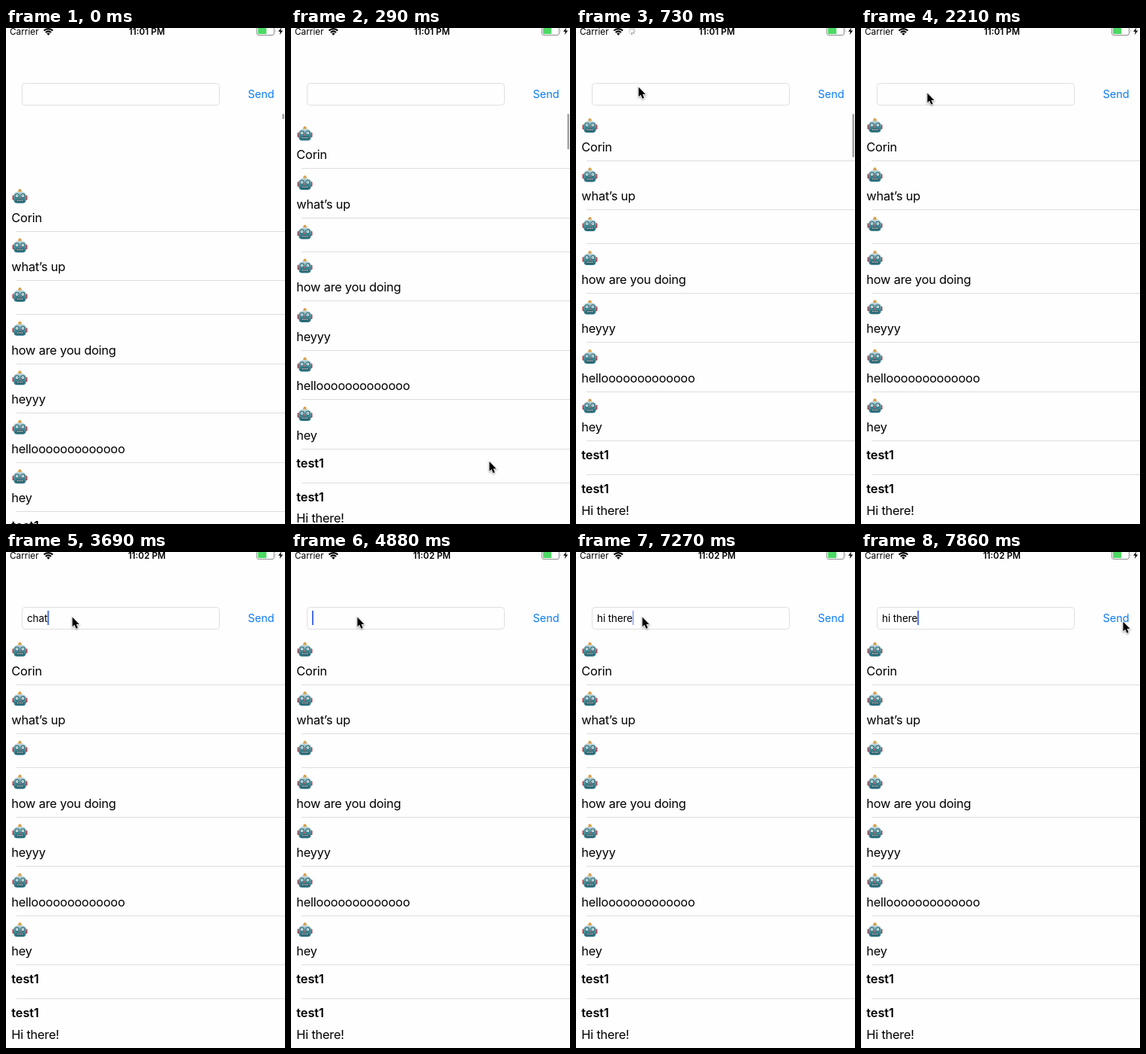
Animation, 372 px wide and 659 px high, one loop 8000 ms. Source, as an HTML page:

```html
<!DOCTYPE html>
<html lang="en">
<head>
<meta charset="utf-8">
<title>Chat</title>
<style>
  html, body { margin: 0; width: 100%; height: 100%; overflow: hidden; background: #fefefe; }
  svg { display: block; width: 372px; height: 659px; }
  text { font-family: Inter, "Liberation Sans", sans-serif; white-space: pre; }
  .row { font-size: 16.4px; letter-spacing: -.22px; }
  .bold { font-weight: 600; }
  .row.bold { letter-spacing: -.1px; }
  .status { font-size: 11.8px; }
  .input { font-size: 13.6px; letter-spacing: -.15px; }
  .send { font-size: 14.6px; letter-spacing: -.1px; fill: #0a7cf8; }
</style>
</head>
<body>
<svg viewBox="0 0 372 659">
  <defs>
    <linearGradient id="metal" x2="0" y2="1">
      <stop offset="0" stop-color="#d6e4e8"/>
      <stop offset=".3" stop-color="#8db4bc"/>
      <stop offset=".6" stop-color="#3f8f9b"/>
      <stop offset="1" stop-color="#246a78"/>
    </linearGradient>
    <g id="robot">
      <rect x=".5" y="9.4" width="3" height="6.4" rx="1.2" fill="#b5434d"/>
      <rect x="17.5" y="9.4" width="3" height="6.4" rx="1.2" fill="#b5434d"/>
      <path d="M2 10.5Q2.6 4 10.5 4T19 10.5L18.4 17Q17.8 20 14.4 20H6.6Q3.2 20 2.6 17Z" fill="url(#metal)"/>
      <path d="M8.1 4.6Q8.3 1 10.5 1T12.9 4.6Z" fill="#d9a04a"/>
      <g fill="#f4fafa" stroke="#2c6f7c" stroke-width="1.2">
        <circle cx="6.6" cy="10" r="2.5"/>
        <circle cx="14.4" cy="10" r="2.5"/>
      </g>
      <g fill="#4a6f79">
        <circle cx="6.6" cy="10" r=".8"/>
        <circle cx="14.4" cy="10" r=".8"/>
      </g>
      <path d="M10.5 11L11.8 13.6H9.2Z" fill="#d0454e"/>
      <rect x="5.4" y="14.8" width="10.2" height="3" rx="1.1" fill="#234750"/>
      <path d="M6.6 16.3H14.7" stroke="#dfeaea" stroke-width="1.5" stroke-dasharray="1.3 .9"/>
    </g>
  </defs>

  <text class="status" x="5" y="8.8">Carrier</text>
  <g fill="none" stroke="#000" stroke-width="2.1">
    <path d="M50.6 3.6A8.3 8.3 0 0 1 62.4 3.6M52.9 5.9A5 5 0 0 1 60.1 5.9"/>
    <path d="M56.5 9.8L54.3 7.6A3.1 3.1 0 0 1 58.7 7.6Z" fill="#000" stroke="none"/>
  </g>
  <g id="spinner" stroke-width="1.1" stroke-linecap="round"></g>
  <text id="clock" class="status bold" x="187.8" y="8.8" text-anchor="middle"></text>
  <rect x="334.5" y="-1.5" width="23" height="11" rx="2.5" fill="none" stroke="#8c8c8c"/>
  <rect x="336" y="0" width="11.3" height="8" rx="1" fill="#4cd964"/>
  <path d="M359 2.3Q360.6 4 359 5.8Z" fill="#8c8c8c"/>
  <path d="M367.3 -.5L363 4.8H365.8L364.8 9L369.2 3.5H366.3Z"/>

  <rect x="21.5" y="73.5" width="263" height="29" rx="4" fill="#fefefe" stroke="#dfdfdf"/>
  <text id="input" class="input" x="28" y="92.6"></text>
  <rect id="caret" y="78" width="2" height="19" fill="#4a6ee0"/>
  <text class="send" x="322.6" y="92.8">Send</text>

  <g id="list"></g>
  <rect id="bar" x="368.4" y="114" width="2.6" rx="1.3" fill="#a3a3a3"/>
  <path id="cursor" d="M0 0V12.8L2.9 10.2L5 15.3L7.3 14.3L5.2 9.4H9.2Z" stroke="#fff"
        paint-order="stroke" stroke-width="1.6" style="filter:drop-shadow(0 1px 1px #0006)"/>
</svg>
<script>
const $ = id => document.getElementById(id);
const LOOP = 8000, LIST_TOP = 110.8, TALL = 65.5, SHORT = 45;

// Each message: sender (empty means the robot) and body.
const messages = [
  ["", "Corin"], ["", "what’s up"], ["", ""], ["", "how are you doing"], ["", "heyyy"],
  ["", "hell" + "o".repeat(13)], ["", "hey"], ["test1", ""], ["test1", "Hi there!"]
];

// Changes of state; every value holds until it is replaced.
const changes = [
  [0, { clock: "11:01 PM", text: "", caret: 0, spin: 0, bar: 1, cursor: [272, 700] }],
  [150, { cursor: [272, 640] }],
  [290, { cursor: [264.5, 576] }],
  [440, { cursor: [205, 400] }],
  [590, { cursor: [112, 150], spin: 1 }],
  [730, { cursor: [83.5, 78.5], spin: 2 }],
  [880, { cursor: [86, 86], spin: 3, bar: .5 }],
  [1030, { cursor: [88.5, 90], spin: 0, bar: 0 }],
  [1470, { cursor: [88.5, 88] }],
  [1620, { cursor: [88.5, 86.5], caret: 1 }],
  [2060, { caret: .5 }],
  [2210, { caret: 0 }],
  [2510, { caret: .5, clock: "11:02 PM" }],
  [2650, { caret: 1 }],
  [2950, { caret: .5 }],
  [3100, { caret: 0 }],
  [3390, { caret: 1, text: "c" }],
  [3540, { text: "cha" }],
  [3690, { text: "chat" }],
  [4290, { text: "cha" }],
  [4440, { text: "ch" }],
  [4730, { text: "c" }],
  [4880, { text: "" }],
  [5320, { caret: .5 }],
  [5470, { caret: 0 }],
  [5620, { spin: 1 }],
  [5770, { spin: 2, caret: 1, text: "h" }],
  [5920, { spin: 3, text: "hi" }],
  [6070, { spin: 0, text: "hi " }],
  [6370, { text: "hi th" }],
  [6520, { text: "hi the" }],
  [6670, { text: "hi ther" }],
  [6820, { text: "hi there" }],
  [7270, { caret: .5 }],
  [7420, { caret: 0, cursor: [135, 98] }],
  [7570, { cursor: [235, 104] }],
  [7710, { caret: .5, cursor: [325, 101] }],
  [7860, { caret: 1, cursor: [349.5, 92.5] }]
];
let merged = {};
const states = changes.map(([time, change]) => merged = { ...merged, ...change, time });

// Critically damped return from an overscrolled list.
function bounce(time) {
  const x = time * .0129;
  return 94 * (1 + x) * Math.exp(-x);
}

function buildList(offset) {
  let top = LIST_TOP + offset, markup = "";
  for (const [sender, body] of messages) {
    markup += sender
      ? `<text class="row bold" x="7.3" y="${top + 24.5}">${sender}</text>`
      : `<use href="#robot" x="8" y="${top + 8}"/>`;
    markup += `<text class="row" x="7.3" y="${top + 53}">${body}</text>`;
    top += body ? TALL : SHORT;
    markup += `<rect x="14" y="${Math.floor(top)}" width="358" height="1" fill="#dddde0"/>`;
  }
  return markup;
}

for (let i = 0; i < 8; i++) {
  $("spinner").innerHTML +=
    `<path d="M0 -2.4V-4.6" stroke="hsl(0 0% ${50 + i * 5}%)" transform="rotate(${-i * 45})"/>`;
}

function render(s) {
  const offset = bounce(s.time);
  $("list").innerHTML = buildList(offset);
  $("bar").setAttribute("height", Math.max(7, 58 - offset));
  $("bar").setAttribute("opacity", s.bar);
  $("clock").textContent = s.clock;
  $("input").textContent = s.text;
  $("caret").setAttribute("x", 28 + (s.text && $("input").getComputedTextLength()));
  $("caret").setAttribute("opacity", s.caret);
  $("spinner").setAttribute("opacity", s.spin ? 1 : 0);
  $("spinner").setAttribute("transform", `translate(74.5 4) rotate(${s.spin * 90})`);
  $("cursor").setAttribute("transform", `translate(${s.cursor})`);
}

let shown;
function tick() {
  const time = performance.now() % LOOP;
  const state = states.findLast(s => s.time <= time);
  if (state !== shown) render(shown = state);
  requestAnimationFrame(tick);
}
tick();
</script>
</body>
</html>
```
